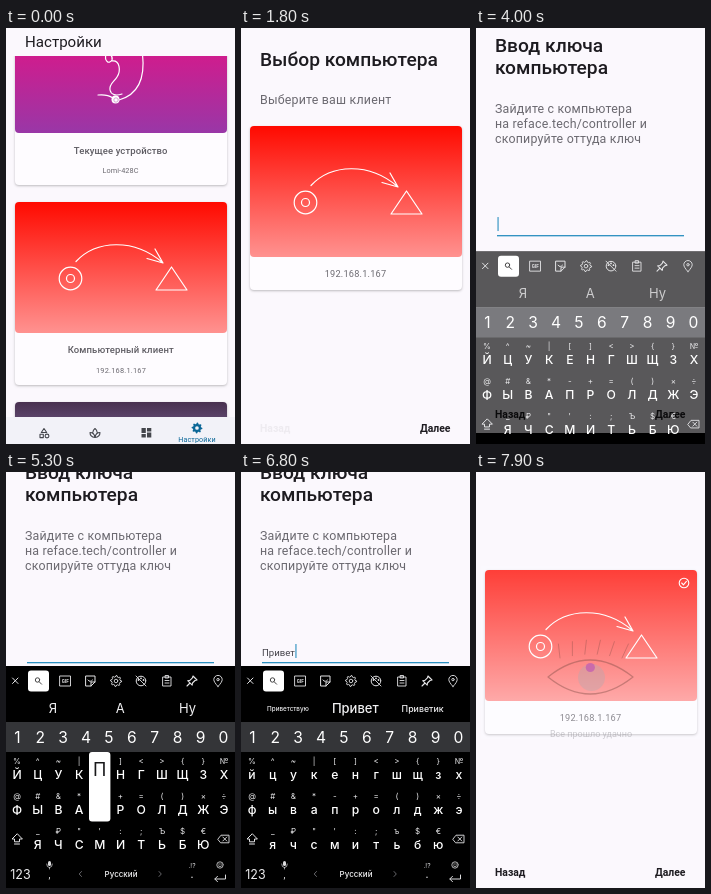
An HTML page with a canvas for the animation above (8 s loop, 229 by 416 pixels).

```html
<!DOCTYPE html>
<html lang="ru">
<head>
<meta charset="utf-8">
<title>Настройки</title>
<style>
  html, body { margin: 0; width: 100%; height: 100%; overflow: hidden; background: #fbf8fd; }
  canvas { display: block; width: 229px; height: 416px; }
</style>
</head>
<body>
<canvas id="stage"></canvas>
<script>
const W = 229, H = 416, LOOP = 8000, STEP = 100;
const BG = '#fbf8fd', INK = '#1d1b20', GREY = '#6b6970', BLUE = '#2a8fc0';
const canvas = document.getElementById('stage');
const ctx = canvas.getContext('2d');
const dpr = window.devicePixelRatio || 1;
canvas.width = W * dpr;
canvas.height = H * dpr;

const clamp = v => Math.max(0, Math.min(1, v));
const ramp = (t, from, to) => clamp((t - from) / (to - from));
const ease = p => p * p * (3 - 2 * p);
const mix = (a, b, p) => a + (b - a) * p;

function text(s, x, y, size, color = INK, weight = 400, align = 'left', spacing = 0, face = 'Roboto') {
  ctx.font = `${weight} ${size}px ${face}, sans-serif`;
  ctx.letterSpacing = spacing + 'px';
  ctx.textAlign = align;
  ctx.fillStyle = color;
  ctx.fillText(s, x, y);
}

const keyText = (s, x, y, size, color = '#fff', weight = 400) =>
  text(s, x, y, size, color, weight, 'center', 0, 'Inter');

function box(x, y, w, h, r, fill) {
  ctx.beginPath();
  ctx.roundRect(x, y, w, h, r);
  ctx.fillStyle = fill;
  ctx.fill();
}

function stroke(d, color = '#fff', width = 1.2) {
  ctx.strokeStyle = color;
  ctx.lineWidth = width;
  ctx.stroke(new Path2D(d));
}

function ring(x, y, r, color = '#fff', width = 1.2) {
  ctx.beginPath();
  ctx.arc(x, y, r, 0, Math.PI * 2);
  ctx.strokeStyle = color;
  ctx.lineWidth = width;
  ctx.stroke();
}

function dot(x, y, r, color) {
  ctx.beginPath();
  ctx.arc(x, y, r, 0, Math.PI * 2);
  ctx.fillStyle = color;
  ctx.fill();
}

function layer(alpha, dx, dy, paint) {
  if (alpha <= 0) return;
  ctx.save();
  ctx.globalAlpha *= alpha;
  ctx.translate(dx, dy);
  paint();
  ctx.restore();
}

function fade(y0, y1, top, bottom) {
  const g = ctx.createLinearGradient(0, y0, 0, y1);
  g.addColorStop(0, top);
  g.addColorStop(1, bottom);
  return g;
}

function cardBody(y, h) {
  ctx.save();
  ctx.shadowColor = 'rgba(0,0,0,.25)';
  ctx.shadowBlur = 2.5 * dpr;
  ctx.shadowOffsetY = dpr;
  box(9, y, 212, h, 4, '#fefcff');
  ctx.restore();
}

function redCard(y, h) {
  cardBody(y, h);
  layer(1, 0, y, () => {
    box(9, 0, 212, 131, 4, fade(0, 131, '#ff0a00', '#ff9290'));
    ring(64.5, 76.5, 11.3);
    ring(64.5, 76.5, 4);
    stroke('M165.5 65 L150 88 H181 Z M70 59.5 C90 38 128 36 156.5 60.5 M149 47 L157 61 L141 56.5');
  });
}

function gear(x, y, r, color, solid) {
  ctx.beginPath();
  for (let i = 0; i <= 32; i++) {
    const a = i / 32 * Math.PI * 2, k = i % 4 < 2 ? r : r * .76;
    ctx.lineTo(x + Math.cos(a) * k, y + Math.sin(a) * k);
  }
  ctx.closePath();
  if (solid) {
    ctx.fillStyle = color;
    ctx.fill();
    dot(x, y, r * .34, '#f2f2f8');
  } else {
    ctx.strokeStyle = color;
    ctx.lineWidth = .9;
    ctx.stroke();
    ring(x, y, r * .33, color, .9);
  }
}

function navBar() {
  const c = '#44464c';
  ctx.fillStyle = '#f2f2f8';
  ctx.fillRect(0, 389, W, 30);
  stroke('M38 400.5 L35.3 404.5 H40.7 Z M34 406.3 h3.3 v3.3 h-3.3 Z', c, 1.1);
  ring(41, 408, 1.9, c, 1.1);
  stroke('M89 409.5 C85.5 409 84 407 84 404.5 C86.5 404.5 88.5 406 89 409.5 C89.5 406 91.5 404.5 94 404.5 C94 407 92.5 409 89 409.5 M86.8 404.5 Q87 402 89 400.5 Q91 402 91.2 404.5', c, 1.1);
  [[135.5, 400, 5], [135.5, 406, 3.5], [141, 400, 3.5], [141, 404.5, 5]]
    .forEach(([x, y, h]) => box(x, y, 4.3, h, 0, c));
  gear(191, 400, 5.4, '#0b6797', true);
  text('Настройки', 191, 413.5, 7.2, '#0b6797', 400, 'center', .1);
}

function cardTitle(s, y) {
  text(s, 114.7, y, 9.5, '#5f5d64', 500, 'center', .1);
}

function settings(t) {
  layer(1, 0, -Math.round(ramp(t, 100, 900)), () => {
    cardBody(-26, 183);
    box(9, -26, 212, 131, 4, fade(20, 105, '#d41a8b', '#9937a7'));
    stroke('M136.5 26 C139 48 134 66 113 72 M100 26 C98 33 103 37 106 32 C107 29 105 27 104 26 M106 33 C114 32 115 43 111 49 C108 54 103 56 104 62 C105 67 110 68 116 66 M92 67 Q101 66 107 70');
    dot(109.5, 71.5, 4, '#fff');
    ring(110, 72, 2.2, '#c77fc5', .7);
    cardTitle('Текущее устройство', 125.6);
    text('Lomi-428C', 114.5, 145.3, 7.3, GREY, 400, 'center', .1);
    redCard(174, 183);
    cardTitle('Компьютерный клиент', 324.9);
    text('192.168.1.167', 115, 345.3, 7.4, GREY, 400, 'center', .2);
    cardBody(374, 60);
    box(9, 374, 212, 60, 4, fade(374, 400, '#48304f', '#66507a'));
  });
  ctx.fillStyle = BG;
  ctx.fillRect(0, 0, W, 28);
  text('Настройки', 19, 18.8, 15.1);
  ctx.fillStyle = `rgba(0,0,0,${.055 * ramp(t, 900, 1100)})`;
  ctx.fillRect(0, 0, W, H);
  if (t >= 1000) {
    ctx.fillStyle = BG;
    ctx.fillRect(0, 385, W, 31);
  }
  layer(1, 0, 29 * ramp(t, 900, 1100), navBar);
}

function nextButton(dy = 0) {
  text('Далее', 179, 404 + dy, 10.4, INK, 700);
}

function checkMark(alpha) {
  layer(alpha, 208, 111, () => {
    ring(0, 0, 4.8, '#fff', 1.1);
    stroke('M-2.3 0 L-.6 1.8 L2.4 -1.7', '#fff', 1.1);
  });
}

// The tapped card grows into the page with the list of clients.
function choose(t) {
  const p = ease(ramp(t, 1100, 1700));
  const out = 1 - ramp(t, 2600, 2900);
  if (p > 0) {
    layer(clamp(p * 3), 0, 0, () =>
      box(mix(8, 0, p), mix(174, 0, p), mix(213, W, p), mix(183, H, p), 4 * (1 - p), BG));
    layer(out, 0, 0, () => {
      redCard(mix(174, 98, p), mix(183, 164, p));
      layer(1 - p * 2, 0, -75 * p, () => cardTitle('Компьютерный клиент', 324.5));
      text('192.168.1.167', 114.5, mix(345, 249.2, p), mix(7.4, 9.2, p), GREY, 400, 'center', .2);
      checkMark(ramp(t, 2100, 2200));
      layer(ramp(p, .4, .95), 0, 0, () => {
        text('Выбор компьютера', 19, 37.6, 19.2, INK, 500);
        text('Выберите ваш клиент', 19, 76, 12.4, GREY, 400, 'left', .2);
      });
    });
  }
  layer(mix(.06 * p, 1, ramp(t, 2600, 2900)), 0, 0, () => text('Назад', 19, 404, 10.4, INK, 700));
  nextButton(18.5 * (1 - ease(ramp(t, 1100, 1400))));
}

const ROWS = ['йцукенгшщзх', 'фывапролджэ', ' ячсмитьбю '];
const HINTS = ['%^~|[]<>{}№', '@#&*-+=()×÷', ' _₽"\':;ъ$€ '];
// letter, row, column, pressed at, entered at
const TAPS = [
  ['п', 1, 4, 5300, 5500], ['р', 1, 5, 5600, 5700], ['и', 2, 5, 5800, 5900],
  ['в', 1, 2, 5900, 6000], ['е', 0, 4, 6100, 6200], ['т', 2, 6, 6200, 6300]
];
const WORDS = [
  ['Я', 'А', 'Ну'], ['Пока', 'По', 'При'], ['Просто', 'При', 'Про'],
  ['Привет', 'При', 'Приду'], ['Приветик', 'Привет', 'Прив'],
  ['Приветик', 'Привет', 'Приве'], ['Приветствую', 'Привет', 'Приветик']
];
const typedCount = t => TAPS.filter(tap => t >= tap[4]).length;
const col = i => 11 + 20.7 * i;

function keyPage(t, lift) {
  const shown = ramp(t, 2800, 3300);
  const typed = TAPS.slice(0, typedCount(t)).map(tap => tap[0]).join('');
  const value = typed.charAt(0).toUpperCase() + typed.slice(1);
  const focused = t >= 3700;
  layer(1 - ramp(t, 7700, 7900), 0, -31 * lift, () => {
    layer(shown, 0, 0, () => {
      text('Ввод ключа', 19, 37.6, 19.2, INK, 500);
      text('компьютера', 19, 59.6, 19.2, INK, 500);
      ['Зайдите с компьютера', 'на reface.tech/controller и', 'скопируйте оттуда ключ']
        .forEach((s, i) => text(s, 19, 99 + 15.2 * i, 12.4, GREY, 400, 'left', .2));
      ctx.fillStyle = focused ? BLUE : '#8b8990';
      ctx.fillRect(21, 221, 187, focused ? 1.3 : 1);
    });
    text(value, 21, 214.7, 9.6, '#45434a');
    const since = t < 5500 ? t - 3700 : t - 6400;
    if (focused && (since < 0 || Math.floor(since / 500) % 2 === 0)) {
      const x = value ? 21.5 + ctx.measureText(value).width : 21.5;
      ctx.fillStyle = BLUE;
      ctx.fillRect(x, 203, 1.1, 14);
    }
  });
  layer(1, 0, -31 * lift, () => {
    text('Назад', 19, 404, 10.4, INK, 700);
    nextButton();
  });
}

function toolbar() {
  const c = '#e4e4e6';
  stroke('M6.5 206 l5.5 5.5 M12 206 l-5.5 5.5', c, 1);
  box(22, 198.5, 21, 21, 3, '#fff');
  ring(31.5, 208, 2.2, '#444', 1);
  stroke('M33.2 209.8 l2.4 2.4', '#444', 1);
  stroke('M54 204 h10.5 v10 h-10.5 Z', c, .9);
  text('GIF', 59.3, 210.8, 4.6, c, 700, 'center');
  stroke('M80 204 h9 v6 l-4 4 h-5 Z M89 210 h-4 v4 M82 208 q2 3 4.5 0', c, 1);
  gear(110, 209, 5.4, c, false);
  ring(135, 209, 4.8, c, 1);
  [[132.5, 208], [135, 206.3], [137.5, 208]].forEach(([x, y]) => dot(x, y, .9, c));
  stroke('M130 204 L140 214', c, .9);
  stroke('M157 205 h8 v9 h-8 Z M159.5 203.5 h3 v2.5 h-3 Z M159 208.5 h4 M159 211 h4', c, .9);
  stroke('M187 204 l4 4 -2 .5 -2.5 2.5 -.3 2.2 -4.5 -4.5 2.2 -.3 2.5 -2.5 Z M183.5 211.5 l-2.5 2.5', c, 1.1);
  stroke('M212 214.5 Q207.8 210 207.8 207.6 A4.2 4.2 0 0 1 216.2 207.6 Q216.2 210 212 214.5 Z', c, .9);
  ring(212, 207.6, 1.2, c, .9);
}

function suggestions(n) {
  const full = 13;
  WORDS[n].forEach((word, i) => {
    const weight = n ? 500 : 400, limit = i === 1 ? 48 : 42;
    ctx.font = `${weight} ${full}px Inter, sans-serif`;
    ctx.letterSpacing = '0px';
    const size = full * Math.min(1, limit / ctx.measureText(word).width);
    keyText(word, 47 + 67.3 * i, 236.5 + size * .35, size, '#f0f0f2', weight);
  });
}

function bottomRow() {
  const c = '#dcdcde', dim = '#66666a';
  keyText('123', 14.5, 406.8, 12.5, '#e8e8ea');
  box(42, 389, 3, 5, 1.5, c);
  stroke('M40.7 392 q0 3.5 2.8 3.5 q2.8 0 2.8 -3.5 M43.5 395.5 v1.5', c, .7);
  text(',', 43.5, 406, 10, c, 400, 'center');
  stroke('M75.5 399.5 l-2.3 2.5 2.3 2.5 M153 399.5 l2.3 2.5 -2.3 2.5', dim, 1);
  keyText('Русский', 115, 405, 8, '#f0f0f2', 500);
  text('.!?', 186, 396, 7, c, 400, 'center');
  text('.', 186, 406, 11, c, 500, 'center');
  ring(214, 393, 3.2, c, .8);
  stroke('M212.5 394 q1.5 1.5 3 0 M212.8 392 h.6 M214.8 392 h.6', c, .8);
  stroke('M219.5 403 v4 h-10.5 M211.5 404.3 l-2.7 2.7 2.7 2.7', c, 1);
}

function keyRows(caps) {
  [...'1234567890'].forEach((d, i) => keyText(d, 11.3 + 22.9 * i, 270.6, 15.6));
  ROWS.forEach((row, r) => {
    const y = 303 + 35 * r;
    [...row].forEach((ch, i) => {
      const hint = HINTS[r][i];
      keyText(hint === 'ъ' ? caps(hint) : hint, col(i), y - 11.3, 8, '#ececee');
      keyText(caps(ch), col(i), y + 4.1, 12.2, '#fff', 500);
    });
  });
  stroke('M11 362 l-5 5 h2.5 v2.8 h5 v-2.8 h2.5 Z M8.5 372 h5', '#e4e4e6', 1);
  stroke('M212 367 l3 -3.8 h8 v7.6 h-8 Z M216.8 365 l4 4 M220.8 365 l-4 4', '#e4e4e6', .9);
}

// The panel is see-through while it slides in; its keys are not.
function keyboard(t, shown) {
  if (shown <= 0) return;
  const n = typedCount(t);
  ctx.fillStyle = '#000';
  ctx.fillRect(0, 405, W, 11);
  layer(1, 0, 53 * (1 - shown), () => {
    layer(clamp(shown * 1.43), 0, 0, () => {
      ctx.fillStyle = '#000';
      ctx.fillRect(0, 194, W, 56);
      ctx.fillRect(0, 280, W, 136);
      ctx.fillStyle = '#343538';
      ctx.fillRect(0, 250, W, 30);
    });
    toolbar();
    layer(clamp(shown * 1.7), 0, 0, () => suggestions(n));
    keyRows(s => n ? s : s.toUpperCase());
    bottomRow();
    TAPS.forEach(([ch, r, i, down]) => {
      if (t < down || t >= down + 200) return;
      const y = 245 + 35 * r;
      box(col(i) - 10.8, y, 21.4, 69.5, 3, '#fff');
      keyText(down === TAPS[0][3] ? ch.toUpperCase() : ch, col(i), y + 23.5, 18, '#18181a');
    });
  });
}

function eye(alpha) {
  layer(alpha, 0, 0, () => {
    const c = '#7c4a44';
    stroke('M72 205 Q114 171 157 205 Q114 239 72 205 Z', c, 1.3);
    dot(115.5, 205.5, 13.5, '#b9a6ae');
    for (let i = 0; i < 6; i++) {
      const x = 84 + 12.4 * i, y = 186 - 4 * Math.sin(i / 5 * Math.PI), k = (i - 1) * 1.6;
      stroke(`M${x} ${y} l${k} -14`, c, .8);
    }
    text('Все прошло удачно', 115, 265, 9, '#8a888e', 400, 'center');
  });
  layer(alpha * 1.9, 0, 0, () => dot(114.3, 195.5, 4.6, '#c45fb0'));
}

function success(t) {
  const p = ramp(t, 7800, 7900);
  if (p <= 0) return;
  redCard(98, 164);
  text('192.168.1.167', 114.5, 249.2, 9.2, GREY, 400, 'center', .2);
  layer(1 - .78 * p, 0, 0, () => box(5, 94, 220, 173, 0, BG));
  checkMark(p);
  eye(.42 * p);
}

function draw(t) {
  ctx.setTransform(dpr, 0, 0, dpr, 0, 0);
  ctx.globalAlpha = 1;
  ctx.lineCap = ctx.lineJoin = 'round';
  ctx.fillStyle = BG;
  ctx.fillRect(0, 0, W, H);
  if (t < 1700) settings(t);
  if (t >= 1000 && t < 2900) choose(t);
  if (t >= 2900) {
    const shown = ease(ramp(t, 3860, 4160)) * (1 - ease(ramp(t, 6800, 7100)));
    keyPage(t, shown);
    keyboard(t, shown);
    success(t);
  }
}

const start = performance.now();
function tick() {
  const t = (performance.now() - start) % LOOP;
  draw(Math.floor(t / STEP) * STEP);
  requestAnimationFrame(tick);
}
tick();
</script>
</body>
</html>
```
